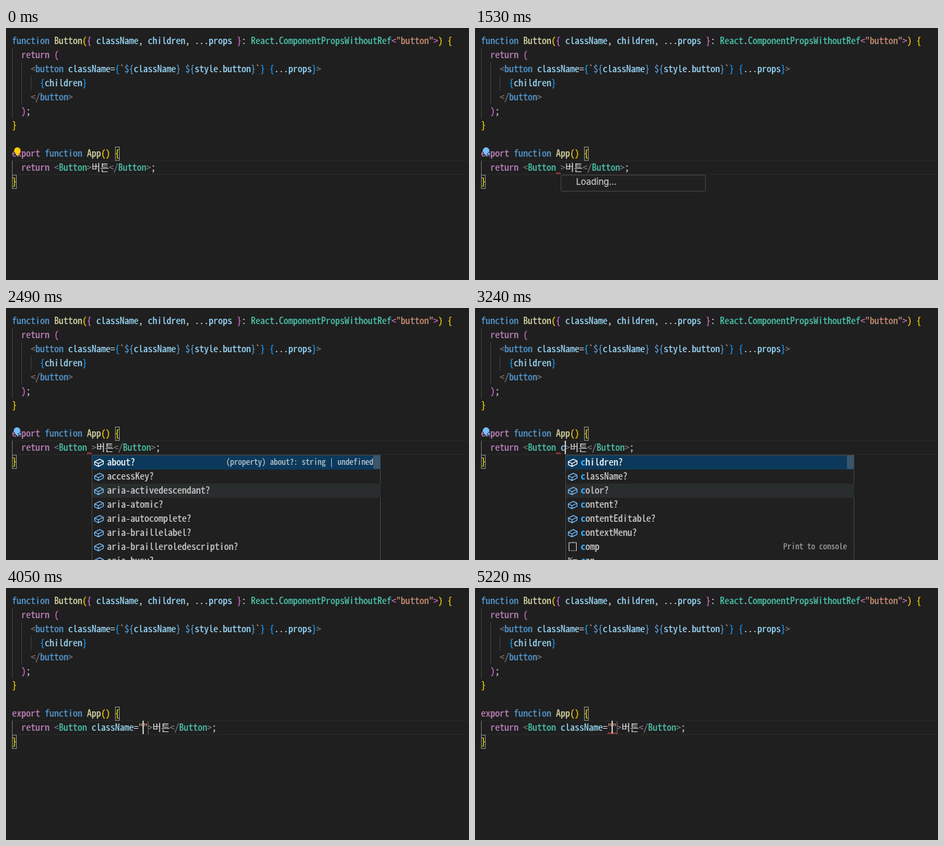
An HTML page for the animation above (5.25 s loop, 692 px wide and 376 px high).

```html
<!DOCTYPE html>
<html lang="en">
<head>
<meta charset="utf-8">
<title>Editor completion</title>
<style>
  html, body { margin: 0; width: 100%; height: 100%; overflow: hidden; background: #1f1f1f; }
  svg { display: block; width: 692px; height: 376px; }
  text {
    font: 14px "Noto Sans Mono CJK KR", "Noto Sans Mono CJK JP", "Noto Sans Mono", "Noto Sans CJK KR", monospace;
    font-size-adjust: ch-width 0.5;
    white-space: pre;
    fill: currentColor;
    stroke: currentColor;
    stroke-width: .2px;
  }
  .detail { font-size: 11.9px; text-anchor: end; }
  .loading { font: 13px Inter, "Open Sans", sans-serif; font-size-adjust: none; }
  .hit { font-weight: 700; color: #2aaaff; }
</style>
</head>
<body>
<svg id="stage" viewBox="0 0 692 376"></svg>
<script>
const LOOP = 5250, LEFT = 9, TOP = 9, COL = 7, ROW = 21;
const ACCEPT = 4050;

// Token colours, keyed by the letter before "~".
const INK = {
  k: '#569cd6', c: '#c586c0', f: '#dcdcaa', t: '#4ec9b0', v: '#9cdcfe',
  s: '#ce9178', p: '#d4d4d4', g: '#808080', y: '#ffd700', m: '#da70d6', b: '#179fff'
};

const esc = s => s.replace(/&/g, '&amp;').replace(/</g, '&lt;');
const rect = (x, y, w, h, fill, extra = '') =>
  `<rect x="${x}" y="${y}" width="${w}" height="${h}" fill="${fill}" ${extra}/>`;
const path = (d, stroke, extra = '') =>
  `<path d="${d}" fill="none" stroke="${stroke}" ${extra}/>`;
const text = (x, y, body, color, cls = '') =>
  `<text x="${x}" y="${y}" color="${color}" class="${cls}">${body}</text>`;

function codeLine(row, source) {
  const spans = source.split('|').map(part => {
    const cut = part.indexOf('~');
    return `<tspan color="${INK[part.slice(0, cut)]}">${esc(part.slice(cut + 1))}</tspan>`;
  });
  return text(LEFT, TOP + row * ROW + 15, spans.join(''), INK.p);
}

const guide = (col, from, to, color) =>
  rect(LEFT + col * COL, TOP + from * ROW, 1, (to - from) * ROW, color);

const bracketBox = (col, row) =>
  rect(LEFT + col * COL + .5, TOP + row * ROW + .5, COL - 1, ROW - 1, '#1c261c', 'stroke="#888"');

const squiggle = (x, cells) =>
  path(`M${x} 218` + 'l1.75 -2.5l1.75 2.5'.repeat(cells * 2), '#f14c4c');

// Bits that stay still.
const LINES = {
  0: 'k~function |f~Button|y~(|m~{|v~ className|p~, |v~children|p~, ...|v~props |m~}|p~: |t~React|p~.|t~ComponentPropsWithoutRef|m~<|s~"button"|m~>|y~) {',
  1: 'c~  return |m~(',
  2: 'g~    <|k~button |v~className|p~=|b~{|s~`|k~${|v~className|k~}|s~ |k~${|v~style|p~.|v~button|k~}|s~`|b~} {|p~...|v~props|b~}|g~>',
  3: 'b~      {|v~children|b~}',
  4: 'g~    </|k~button|g~>',
  5: 'm~  )|p~;',
  6: 'y~}',
  8: 'c~export |k~function |f~App|y~() {',
  10: 'y~}'
};
const backdrop = rect(0, 0, 692, 376, '#1f1f1f')
  + rect(LEFT, 198, 681, 1, '#292929') + rect(LEFT, 218, 681, 1, '#292929')
  + guide(0, 1, 6, '#404040') + guide(2, 2, 5, '#404040') + guide(4, 3, 4, '#404040')
  + guide(0, 9, 10, '#707070')
  + bracketBox(22, 8) + bracketBox(0, 10)
  + Object.entries(LINES).map(([row, src]) => codeLine(+row, src)).join('');

// Suggestion list.
const cube = (x, y, color) => path(
  'M1.5 6.3L9 2.6L14.5 5.3V9.7L7 13.4L1.5 10.7ZM1.5 6.3L7 9L14.5 5.3M7 9V13.4',
  color, `stroke-width="1.2" stroke-linejoin="round" transform="translate(${x} ${y})"`);
const snippet = (x, y) =>
  path(`M${x + 2.5} ${y + 14}v-12h11v12`, '#ccc') +
  path(`M${x + 2} ${y + 14}h12`, '#ccc', 'stroke-dasharray="2 1.4"');

const marked = label => label.split('*')
  .map((s, i) => i % 2 ? `<tspan class="hit">${s}</tspan>` : s).join('');

function listRow(x, entry, i) {
  const y = 220 + i * ROW, focused = i === 0;
  const kind = '#%'.includes(entry[0]) ? entry[0] : '';
  const [label, detail] = entry.slice(kind.length).split('|');
  const icon = kind === '#' ? snippet(x + 3, y + 2)
    : kind === '%' ? text(x + 4, y + 15, '%=', '#ccc')
    : cube(x + 3, y + 3, focused ? '#fff' : '#75beff');
  const back = focused ? '#0c395b' : i === 2 ? '#2a2d2e' : '';
  return (back ? rect(x + 1, y, 431, ROW, back) : '') + icon
    + text(x + 23, y + 15, marked(label), focused ? '#fff' : '#d0d0d0')
    + (detail ? text(x + 421, y + 14, detail, '#a6a6a6', 'detail') : '');
}

const popup = (x, slider, entries) =>
  rect(x + .5, 219.5, 431, 254, '#202020', 'stroke="#454545"')
  + entries.map((entry, i) => listRow(x, entry, i)).join('')
  + rect(x + 421, 220, 10.5, slider, 'rgba(121,121,121,.45)');

const loading = rect(128.5, 219.5, 216, 24, '#202020', 'stroke="#454545" rx="2"')
  + text(151, 234, 'Loading...', '#ccc', 'loading');

const bulb = (x, color) =>
  `<path d="M${x - 2} 190v-2.6a4.9 4.9 0 1 1 4 0v2.6z" fill="${color}"/>`;
const sparkBulb = bulb(16.5, '#75beff')
  + '<path d="M21 184.5l1 2.5l2.5 1l-2.5 1l-1 2.5l-1-2.5l-2.5-1l2.5-1z" fill="#75beff" stroke="#1f1f1f" stroke-width=".6"/>';

// Timed layers: [from, to, drawing].
const layers = [];
const show = (from, to, body) => layers.push({ from, to, body });

const typing = [
  [0, ''], [960, ' '], [3000, ' c'], [3330, ' cl'], [3600, ' cla'], [ACCEPT, ' className=""']
];
typing.forEach(([at, typed], i) => {
  const end = i + 1 < typing.length ? typing[i + 1][0] : LOOP;
  const [name, quotes] = typed.split('=');
  const attr = `v~${name}` + (quotes ? `|p~=|s~${quotes}` : '');
  show(at, end, codeLine(9, `c~  return |g~<|t~Button|${attr}|g~>|p~버튼|g~</|t~Button|g~>|p~;`));

  // The caret blinks every half second, restarting at each key.
  const x = 121 + COL * (typed.length - (quotes ? 1 : 0));
  const caret = rect(x - 1, 198, 2, 20, '#c4c4c4');
  for (let on = at || 350; on < end; on += 1000) show(on, Math.min(on + 500, end), caret);
});

show(0, 1140, bulb(17, '#ffcc00'));
show(1350, ACCEPT, sparkBulb);
show(1260, ACCEPT, squiggle(121, 1));
show(ACCEPT + 150, LOOP, squiggle(198, 2));
show(ACCEPT, LOOP, rect(212, 199, 1, 19, '#6a6a6a'));

show(1230, 1590, loading);
show(1590, 3000, popup(128, 20, [
  'about?', 'accessKey?', 'aria-activedescendant?', 'aria-atomic?', 'aria-autocomplete?',
  'aria-braillelabel?', 'aria-brailleroledescription?', 'aria-busy?'
]));
show(1770, 3000, text(549, 234, '(property) about?: string | undefined', '#c3ccd3', 'detail'));
show(3000, 3330, popup(135, 20, [
  '*c*hildren?', '*c*lassName?', '*c*olor?', '*c*ontent?', '*c*ontentEditable?',
  '*c*ontextMenu?', '#*c*omp|Print to console', '%*c*on'
]));
show(3330, 3600, popup(142, 60, [
  '*cl*assName?', '#*cl*ass|Class Definition', 'on*Cl*ick?', 'on*Cl*ickCapture?',
  'onCanP*l*ay?', 'onCanP*l*ayCapture?', 'onDoub*l*e*C*lick?', 'onDoub*l*e*C*lickCapture?'
]));
show(3600, ACCEPT, popup(149, 160, [
  '*cla*ssName?', '#*cla*ss|Class Definition', '#use*Cal*lbackSnippet|useCallback',
  'on*C*anP*la*y?', 'on*C*anP*la*yCapture?', 'on*C*anP*la*yThrough?',
  'on*C*anP*la*yThroughCapture?', 'on*Cl*ickC*a*pture?'
]));

const stage = document.getElementById('stage');
stage.innerHTML = backdrop + layers.map(l => `<g class="layer">${l.body}</g>`).join('');
const nodes = stage.querySelectorAll('.layer');

const start = performance.now();
function draw() {
  const t = (performance.now() - start) % LOOP;
  layers.forEach(({ from, to }, i) => {
    nodes[i].style.display = t >= from && t < to ? '' : 'none';
  });
  requestAnimationFrame(draw);
}
draw();
</script>
</body>
</html>
```
